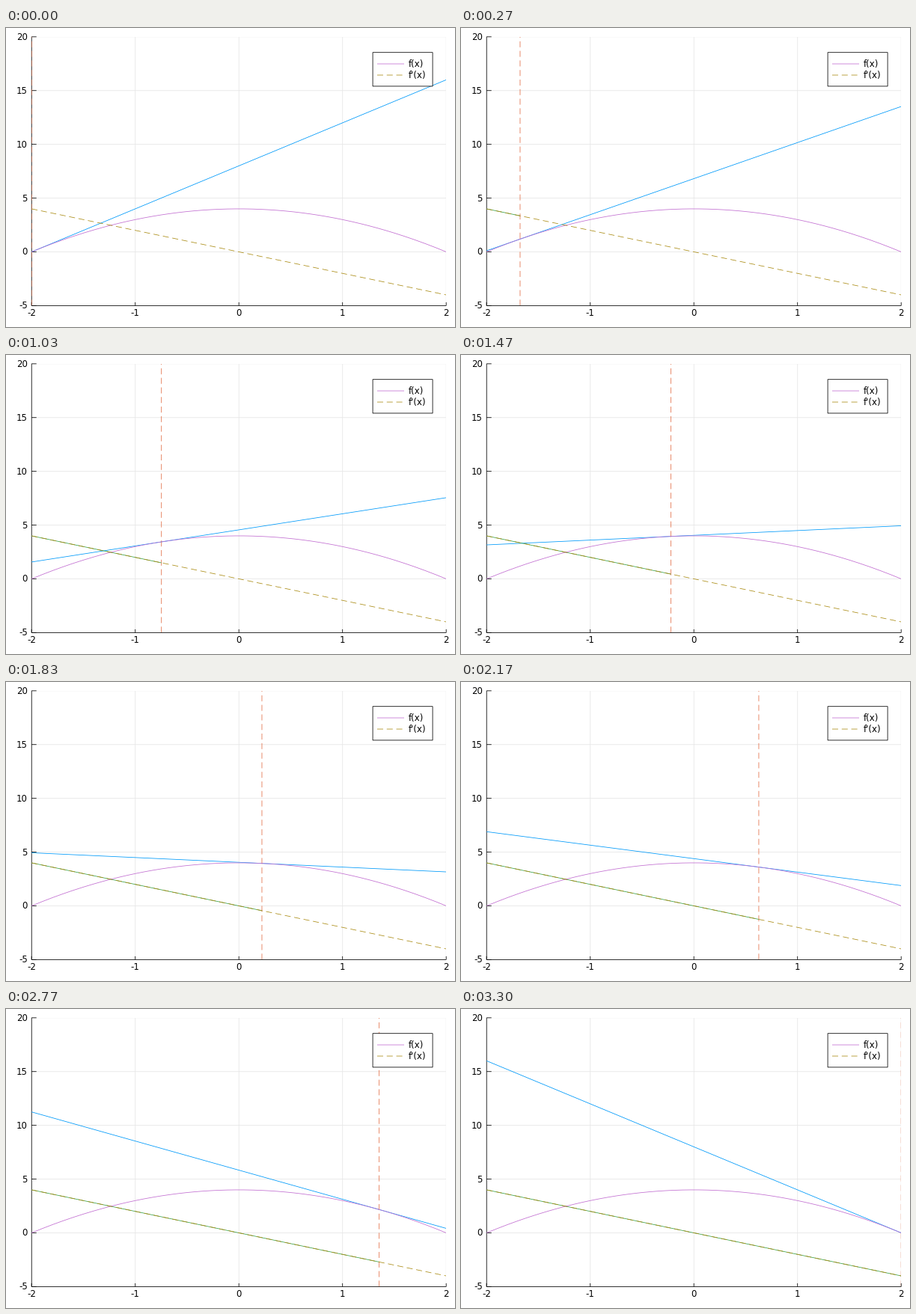
A matplotlib script for the animation above (3.33 s loop, 600 px wide and 400 px high).

```python
import numpy as np
import matplotlib.pyplot as plt
from matplotlib.animation import FuncAnimation
from matplotlib.patches import Rectangle

W, H, DPI = 600, 400, 100
LEFT, RIGHT, TOP, BOTTOM = 34.2, 588.2, 11.8, 371.4
PX = 72 / DPI  # one pixel in points
LINE = 0.8 * PX
FONT = 11.8 * PX
TICK_MS, TICKS = 10, 333
STEPS = 100

BLUE, ORANGE, GREEN = "#009afa", "#e36f47", "#3ea44e"
PURPLE, GOLD = "#c371d2", "#ac8e18"
GRID = "#e6e6e6"
DASH = (0, (10, 6))  # in line widths

plt.rcParams["font.family"] = "DejaVu Sans"
plt.rcParams["lines.scale_dashes"] = True

fig = plt.figure(figsize=(W / DPI, H / DPI), dpi=DPI, facecolor="white")
ax = fig.add_axes([0, 0, 1, 1])
ax.set_xlim(0, W)
ax.set_ylim(H, 0)
ax.axis("off")

plot_area = Rectangle((LEFT, TOP), RIGHT - LEFT, BOTTOM - TOP,
                      transform=ax.transData)


def px(x):
    return LEFT + (np.asarray(x) + 2) / 4 * (RIGHT - LEFT)


def py(y):
    return BOTTOM - (np.asarray(y) + 5) / 25 * (BOTTOM - TOP)


def f(x):
    return 4 - x ** 2


def slope(x):
    return -2 * x


def stroke(xs, ys, color, z, style="-"):
    line, = ax.plot(xs, ys, color=color, lw=LINE, ls=style, zorder=z,
                    snap=False, solid_capstyle="butt")
    return line


def curve(xs, ys, color, z, style="-"):
    line = stroke(px(xs), py(ys), color, z, style)
    line.set_clip_path(plot_area)
    return line


def label(x, y, text, align):
    ax.text(x, y, text, ha=align, va="baseline", fontsize=FONT,
            color="black", zorder=12)


# Grid, ticks and tick labels
for v in range(-2, 3):
    x = px(v)
    curve([v, v], [-5, 20], GRID, 1)
    stroke([x, x], [BOTTOM, BOTTOM - 4.5], "black", 2)
    label(x, 385, str(v), "center")
for v in range(-5, 21, 5):
    y = py(v)
    curve([-2, 2], [v, v], GRID, 1)
    stroke([LEFT, LEFT + 6.5], [y, y], "black", 2)
    label(29, y + 4, str(v), "right")
stroke([LEFT, LEFT], [TOP, BOTTOM], "black", 2)
stroke([LEFT, RIGHT], [BOTTOM, BOTTOM], "black", 2)

# Curves
ends = np.array([-2.0, 2.0])
xs = np.linspace(-2, 2, 200)
tangent = curve(ends, ends, BLUE, 3)
marker = curve([0, 0], [-5, 20], ORANGE, 4, DASH)
trace = curve(ends, slope(ends), GREEN, 5)
curve(xs, f(xs), PURPLE, 6)
curve(ends, slope(ends), GOLD, 7, DASH)

# Legend
ax.add_patch(Rectangle((490.1, 32.7), 80, 45.2, fc="white", ec="black",
                       lw=LINE, zorder=10, snap=False))
for y, color, style, text in ((48, PURPLE, "-", "f(x)"),
                              (63, GOLD, DASH, "f'(x)")):
    stroke([496, 532], [y, y], color, 11, style)
    label(538, y + 4, text, "left")


def update(tick):
    # Steps of 1/30 s, rounded to 10 ms ticks
    step = (3 * tick + 1) // 10
    a = -2 + 4 * step / (STEPS - 1)
    tangent.set_ydata(py(f(a) + slope(a) * (ends - a)))
    marker.set_xdata(px([a, a]))
    reach = np.array([-2.0, a])
    trace.set_data(px(reach), py(slope(reach)))
    return tangent, marker, trace


anim = FuncAnimation(fig, update, frames=TICKS, interval=TICK_MS,
                     repeat=True, repeat_delay=0, blit=False)
plt.show()
```
